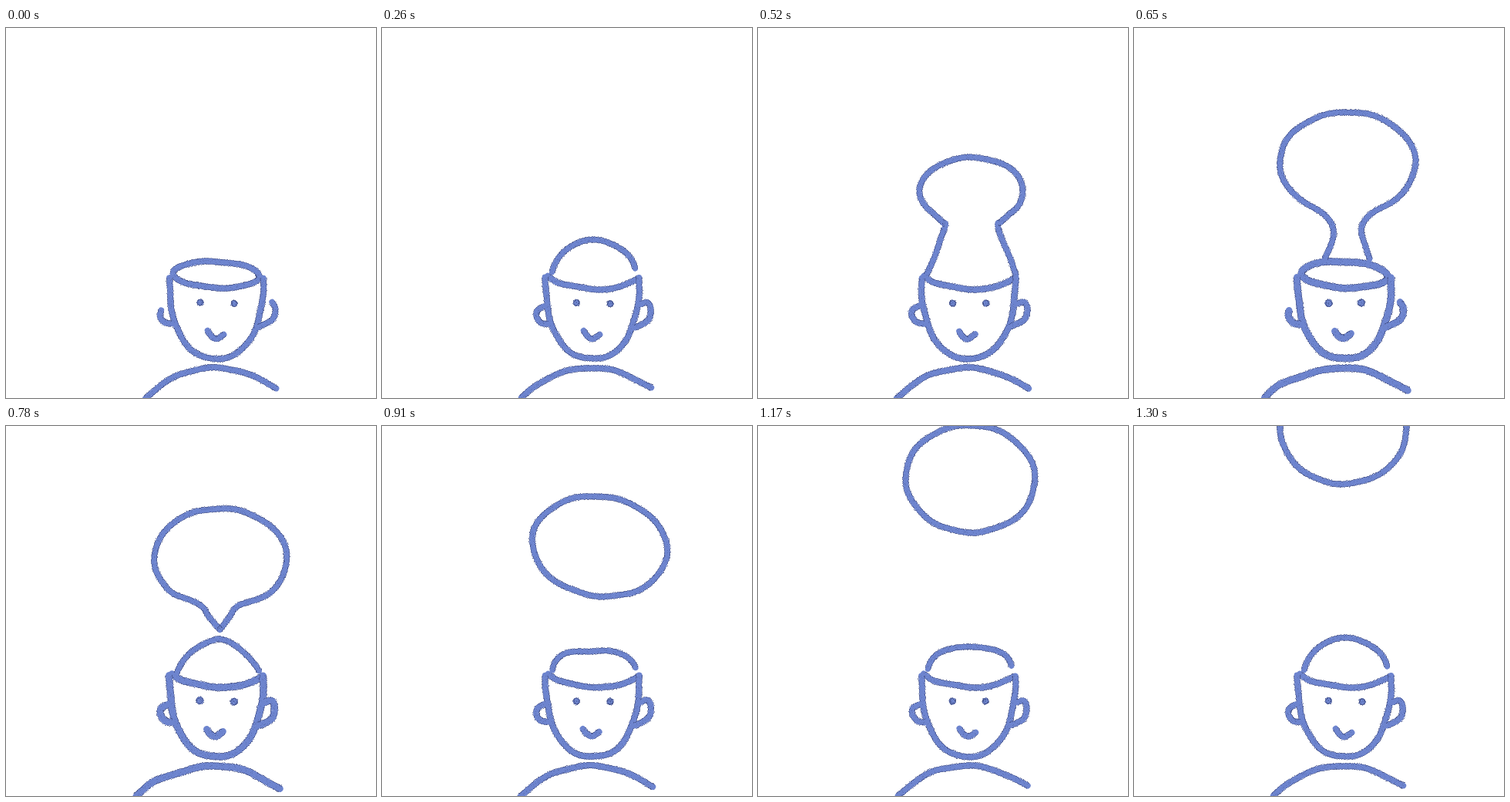
Animation, 480 px wide and 480 px high, one loop 1.43 s. Source, as an HTML page with a canvas:

```html
<!DOCTYPE html>
<html lang="en">
<head>
<meta charset="utf-8">
<title>Thought bubble</title>
<style>
  html, body { margin: 0; width: 100%; height: 100%; overflow: hidden; background: #fff; }
  canvas { display: block; width: 480px; height: 480px; }
</style>
</head>
<body>
<canvas id="stage" width="480" height="480"></canvas>
<script>
const ctx = document.getElementById('stage').getContext('2d');
const STEP = 130;
const INK = '#6d84ce', EDGE = '#414d83', LIGHT = '#7f94de';
const { PI, sin, cos, abs, sign, round } = Math;

function seeded(seed) {
  return () => {
    seed = (seed * 1664525 + 1013904223) >>> 0;
    return seed / 4294967296;
  };
}

// Superellipse arc; the exponent sets how square (over 2) or pointed (under 2) it is.
function arc(cx, cy, rx, ry, from = 0, to = 2 * PI, power = 2, steps = 24) {
  const bend = v => sign(v) * abs(v) ** (2 / power);
  return Array.from({ length: steps + 1 }, (_, i) => {
    const a = from + (to - from) * i / steps;
    return [cx + rx * bend(cos(a)), cy + ry * bend(sin(a))];
  });
}

function tilt(points, cx, cy, angle) {
  const c = cos(angle), s = sin(angle);
  return points.map(([x, y]) => [
    cx + (x - cx) * c - (y - cy) * s,
    cy + (x - cx) * s + (y - cy) * c
  ]);
}

// Top of the head, from the left temple over to the right one.
function crown(height, power = 2, dip = 0) {
  return arc(275, 325, 55, height, 1.05 * PI, 1.92 * PI, power)
    .map(([x, y]) => [x, y + dip * cos((x - 275) / 55 * PI / 2) ** 2]);
}

// Symmetric bulb on a neck that runs down to a base.
function bulb(cy, rx, ry, neckY, neckR, baseY, baseR) {
  const half = arc(0, cy, rx, ry, -PI / 2, PI / 4, 2, 8);
  const [endX, endY] = half[8];
  half.push([neckR + (endX - neckR) / 4, (endY + neckY) / 2], [neckR, neckY], [baseR, baseY]);
  const left = half.slice(1).reverse().map(([x, y]) => [-x, y]);
  return [...left, ...half].map(([x, y]) => [277 + x, y]);
}

// The freed bubble speeds up as it rises.
function floating(n) {
  const cx = 286 - 3.5 * n, cy = 172 - 16 * n ** 1.7;
  return tilt(arc(cx, cy, 90 - 2 * n, 62 + 2.5 * n), cx, cy, 0.2 - 0.05 * n);
}

const poses = [
  { open: true },
  { top: crown(34, 3, 3) },
  { top: crown(50) },
  { bubble: bulb(255, 60, 31, 288, 54, 320, 57) },
  { bubble: bulb(212, 67, 44, 260, 35, 321, 58) },
  { open: true, bubble: bulb(175, 88, 66, 265, 18, 300, 29) },
  { top: crown(49, 1.5), bubble: tilt(bulb(172, 86, 65, 248, 13, 264, 0), 277, 264, 0.015) },
  { top: crown(36, 2.5, 3), bubble: floating(1) },
  { top: crown(30, 4, 8), bubble: floating(2) },
  { top: crown(40, 2.5, 2), bubble: floating(3) },
  { top: crown(50), bubble: floating(4) }
];

function head(open, reach) {
  const earL = [[209, 361], [201, 366], [200, 374], [206, 382], [215, 384]];
  const earR = [[336, 358], [345, 356], [349, 365], [345, 379], [328, 388]];
  const ears = [earL, earR].map(ear => open ? ear.slice(1) : ear);
  const brim = open
    ? tilt(arc(273, 320, 56, 17), 273, 320, 0.04)
    : [[215, 321], [228, 330], [252, 336], [284, 339], [308, 336], [333, 324]];
  return [
    brim,
    arc(273, 324, 61, 105, PI, 0, 2.3),
    ...ears,
    [[261, 393], [266, 400], [273, 403], [282, 397]],
    [[181 - reach, 480], [203 - reach, 462], [229, 448], [264, 441], [294, 443],
      [321, 452], [350 + reach / 2, 467 + reach / 3]],
    arc(252, 356.5, 0.6, 0.6),
    arc(295.5, 357, 0.5, 0.5)
  ];
}

// Catmull-Rom sampling at roughly one point per pixel.
function smooth(knots) {
  const at = i => knots[Math.max(0, Math.min(knots.length - 1, i))];
  const points = [];
  for (let i = 0; i < knots.length - 1; i++) {
    const [a, b, c, d] = [at(i - 1), at(i), at(i + 1), at(i + 2)];
    const count = Math.ceil(Math.hypot(c[0] - b[0], c[1] - b[1]));
    for (let k = 0; k < count; k++) {
      const t = k / count;
      points.push([0, 1].map(j => b[j] + 0.5 * t * (c[j] - a[j] +
        t * (2 * a[j] - 5 * b[j] + 4 * c[j] - d[j] +
        t * (3 * (b[j] - c[j]) + d[j] - a[j])))));
    }
  }
  points.push(knots[knots.length - 1]);
  return points;
}

function crayon(knots, width, random) {
  const phase = random() * 2 * PI;
  const points = smooth(knots).map(([x, y]) => [
    x + 0.6 * sin(y / 9 + phase),
    y + 0.6 * sin(x / 9 + phase)
  ]);
  ctx.globalAlpha = 1;
  ctx.strokeStyle = INK;
  ctx.lineWidth = width;
  ctx.lineCap = ctx.lineJoin = 'round';
  ctx.beginPath();
  points.forEach(p => ctx.lineTo(...p));
  ctx.stroke();

  for (let i = 1; i < points.length; i++) {
    const [x, y] = points[i];
    const dx = x - points[i - 1][0], dy = y - points[i - 1][1];
    const len = Math.hypot(dx, dy) || 1;
    const speck = (off, color, alpha) => {
      ctx.globalAlpha = alpha;
      ctx.fillStyle = color;
      ctx.fillRect(round(x - dy / len * off - 0.5), round(y + dx / len * off - 0.5), 1, 1);
    };
    for (const side of [-1, 1]) {
      speck(side * (width / 2 - 0.6 + random() * 1.2), EDGE, 0.4 + random() * 0.5);
    }
    speck((random() - 0.5) * width, random() < 0.5 ? LIGHT : EDGE, 0.35);
  }
}

function draw(index) {
  const { open, top, bubble } = poses[index];
  const random = seeded(index % 8 * 97 + 11);
  // The body swells while the bubble breaks free.
  const reach = 15 * Math.exp(-((index - 5.5) ** 2));
  const weight = 7.6 + reach / 10;
  ctx.globalAlpha = 1;
  ctx.fillStyle = '#fff';
  ctx.fillRect(0, 0, 480, 480);
  head(open, reach).forEach(stroke => crayon(stroke, weight, random));
  if (top) crayon(top, 7.2, random);
  if (bubble) crayon(bubble, 7.4, random);
}

let shown = -1;
function tick() {
  const index = Math.floor(performance.now() / STEP) % poses.length;
  if (index !== shown) draw(shown = index);
  requestAnimationFrame(tick);
}
tick();
</script>
</body>
</html>
```
